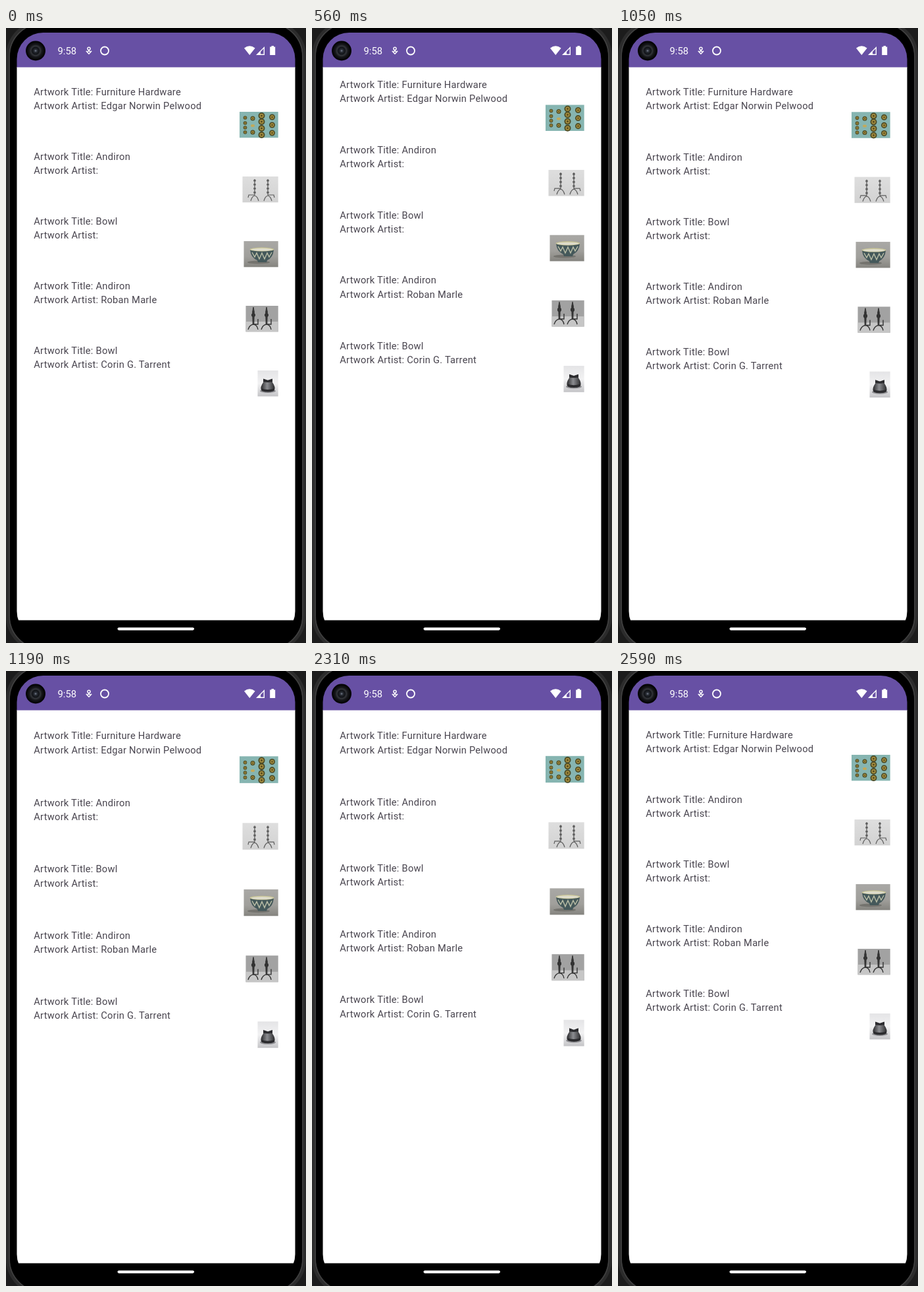
Animation, 456 px wide and 932 px high, one loop 3.22 s. Source, as an HTML page:

```html
<!DOCTYPE html>
<html lang="en">
<head>
<meta charset="utf-8">
<title>Artwork list</title>
<style>
html, body { margin: 0; width: 100%; height: 100%; overflow: hidden; background: #000; }
svg { display: block; width: 456px; height: 932px; }
text { font: 14.7px Roboto, sans-serif; letter-spacing: .24px; fill: #49454f; }
.clock { font-size: 14.8px; letter-spacing: 0; fill: #fff; }
</style>
</head>
<body>
<svg viewBox="0 0 456 932">
  <defs>
    <clipPath id="screen"><rect x="16.5" y="7" width="423" height="917" rx="40"/></clipPath>
    <radialGradient id="lens">
      <stop offset="0" stop-color="#7b8494"/><stop offset=".16" stop-color="#2a2e36"/>
      <stop offset=".4" stop-color="#101216"/><stop offset=".55" stop-color="#33353a"/>
      <stop offset=".75" stop-color="#151619"/><stop offset="1" stop-color="#08080a"/>
    </radialGradient>
    <linearGradient id="pale" x2="0" y2="1"><stop stop-color="#dedede"/><stop offset="1" stop-color="#d2d2d2"/></linearGradient>
    <linearGradient id="grey" x2="0" y2="1"><stop stop-color="#a9a8a5"/><stop offset=".6" stop-color="#a09f9b"/><stop offset="1" stop-color="#85847f"/></linearGradient>
    <linearGradient id="fade" x2="0" y2="1"><stop stop-color="#e4e4e6"/><stop offset=".5" stop-color="#f2f2f3"/><stop offset="1" stop-color="#c4c4c7"/></linearGradient>
    <linearGradient id="metal"><stop stop-color="#2a2a2c"/><stop offset=".45" stop-color="#8c8d91"/><stop offset="1" stop-color="#2a2a2c"/></linearGradient>
  </defs>

  <rect width="456" height="932" fill="#1c1c1c"/>
  <rect x="3" y="-9" width="450" height="952" rx="52" fill="#000" stroke="#2c2c2c" stroke-width="6"/>
  <rect x="5" y="-7" width="446" height="948" rx="50" fill="none" stroke="#404040" stroke-width="1.5"/>
  <g clip-path="url(#screen)">
    <rect y="59" width="456" height="838.5" fill="#fff"/>
    <g id="list"></g>
    <rect width="456" height="59.5" fill="#6750a4"/>
  </g>
  <rect x="169.5" y="908.5" width="116.5" height="4.2" rx="2.1" fill="#fff"/>

  <circle cx="45" cy="34.5" r="15" fill="#050506"/>
  <circle cx="45" cy="34.5" r="13" fill="url(#lens)"/>
  <text class="clock" x="78.5" y="40">9:58</text>
  <g fill="none" stroke="#fff" stroke-width="1.4">
    <circle cx="126" cy="31.3" r="2.1"/>
    <path d="M121.8 34.8L126 39.2L130.2 34.8M123.6 36.4L126 34.6L128.4 36.4"/>
    <circle cx="150" cy="34.5" r="6" stroke-width="1.8"/>
  </g>
  <g fill="#fff">
    <path d="M362 30.6Q370.3 24 378.6 30.6L370.3 41Z"/>
    <path d="M393 28V41H380Z"/>
    <path d="M391.6 31.3V39.6H387V36Z" fill="#6750a4"/>
    <path d="M403.5 27H407V28.4H409.2V41H401.2V28.4H403.5Z"/>
  </g>
</svg>
<script>
const ROW = 98, TOP = 60, BOTTOM = 897, LOOP = 3220;

const ring = (x, y, r) =>
  `<circle cx="${x}" cy="${y}" r="${r}" fill="#4b4a26"/>` +
  `<circle cx="${x}" cy="${y}" r="${r * .65}" fill="#a08a3c"/><circle cx="${x}" cy="${y}" r="${r * .25}" fill="#4a3d18"/>`;
const column = (x, r, ys) => ys.map(y => ring(x, y, r)).join('');
const back = (x, fill) => `<rect x="${x}" width="${413.7 - x}" height="39.3" fill="${fill}"/>`;

const knobs = back(355, '#86b5b1') + column(363.5, 2.8, [9, 17, 24, 31]) + column(375, 3.5, [10, 31]) +
  '<ellipse cx="375" cy="21" rx="3" ry="2" fill="#c3aa5a"/>' +
  column(388.5, 5, [6, 15, 25, 35]) + column(404.5, 4.5, [8, 20, 32]);

const andiron = (x, dir) => `<g transform="translate(${x} 0) scale(${dir} 1)" stroke="#5c5c5c" fill="none">
  <path d="M0 4V28" stroke-width="1.3"/><path d="M0 5V27" stroke-width="3.4" stroke-dasharray="2.6 3.4"/>
  <path d="M-6 37Q-4 30 0 29Q4 30 6 37M0 28H-9L-10 32" stroke-width="1.2"/></g>`;
const tallIron = x => `<g transform="translate(${x} 0)" stroke="#333" fill="#333">
  <path d="M0 2L1.3 9L.8 28H-.8L-1.3 9Z"/><circle cy="14" r="2.6"/>
  <path d="M-8 36Q-6 29 0 28Q6 29 7 36M1 28H7V20" fill="none" stroke-width="1.4"/></g>`;

const bowl = back(361.5, 'url(#grey)') + `<ellipse cx="384" cy="32" rx="17" ry="2.5" fill="#74736e"/>
  <path d="M371 13Q372 25 382 29L383 32H396L397 29Q406 25 407 13Z" fill="#44585a"/>
  <path d="M374 17L378 24L381 18L385 27L389 18L393 27L397 18L400 24L404 17" fill="none" stroke="#b9bda6" stroke-width="1.4"/>
  <ellipse cx="389" cy="12.5" rx="18.5" ry="3" fill="#c9c596"/><ellipse cx="389" cy="12.8" rx="16.5" ry="2" fill="#dedccb"/>`;
const pot = back(382.5, 'url(#fade)') + `<ellipse cx="398" cy="31" rx="12" ry="3" fill="#8c8c90"/>
  <path d="M391 13Q398 16 405 13L405 18Q410 25 408 30Q404 32.5 398 32.5Q392 32.5 388 30Q386 25 391 18Z" fill="url(#metal)"/>
  <path d="M391 12.5Q394 13 398 15Q402 13 405 12.5L405 17Q398 19 391 17ZM388 27Q398 31 408 27L407 31Q398 34 389 31Z" fill="#2b2b2e"/>`;

const works = [
  ['Furniture Hardware', 'Edgar Norwin Pelwood', knobs],
  ['Andiron', '', back(359.5, 'url(#pale)') + andiron(378, 1) + andiron(398, -1)],
  ['Bowl', '', bowl],
  ['Andiron', 'Roban Marle', back(364.5, '#a2a2a2') +
    '<rect x="364.5" y="24" width="49.2" height="15.3" fill="#c6c6c6"/>' + tallIron(376) + tallIron(396)],
  ['Bowl', 'Corin G. Tarrent', pot]
];

const list = document.getElementById('list');
const parts = [];
function add(y, markup) {
  list.insertAdjacentHTML('beforeend', `<g>${markup}</g>`);
  parts.push({ y, node: list.lastElementChild });
}
works.forEach(([title, artist, picture], i) => {
  const y = i * ROW;
  add(102 + y, `<text x="42.3">Artwork Title: ${title}</text>`);
  add(123 + y, `<text x="42.3">Artwork Artist: ${artist}</text>`);
  add(127 + y, picture);
});

// Overscroll: positive pulls down from the top, negative pulls up from the bottom.
const A = .0425, B = 2.3e-5;
const pulls = [
  [0, 0], [420, -.26], [560, -.55], [630, -.83], [700, -.98],
  [980, -.35], [1050, .11], [1120, .5], [1190, .83], [1400, .93], [1470, 1],
  [2310, .66], [2380, .36], [2450, .17], [2520, .07], [2590, 0]
];

function draw(now) {
  const t = now % LOOP;
  const pull = pulls.findLast(p => p[0] <= t)[1];
  for (const { y, node } of parts) {
    const d = pull < 0 ? BOTTOM - y : y - TOP;
    const shift = pull * (A * d - B * d * d);
    const scale = 1 + Math.abs(pull) * (A - 2 * B * d);
    node.setAttribute('transform', `translate(0 ${y + shift}) scale(1 ${scale})`);
  }
}
const start = performance.now();
(function tick() {
  draw(performance.now() - start);
  requestAnimationFrame(tick);
})();
</script>
</body>
</html>
```
